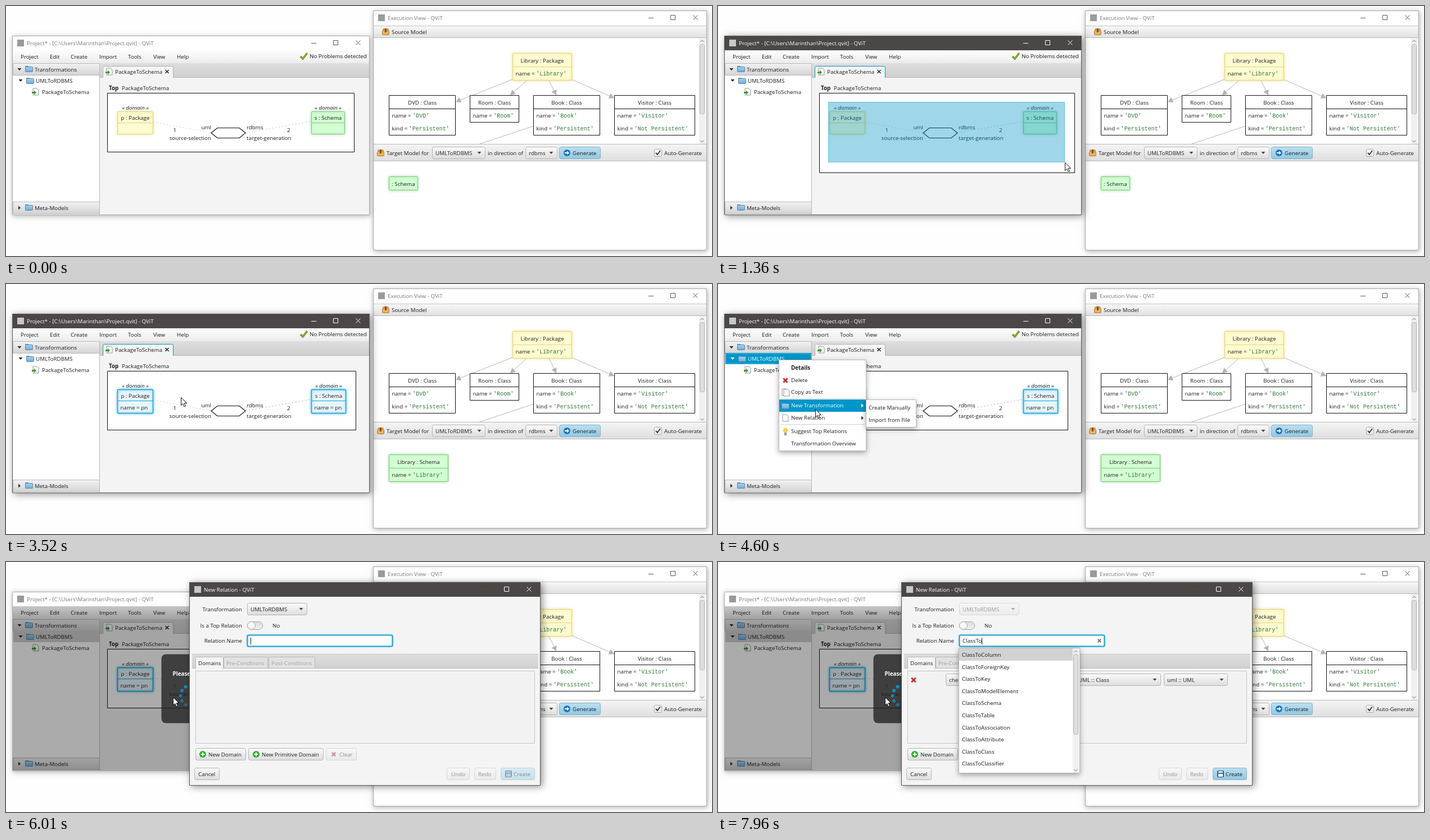
An HTML page with a canvas for the animation above (7.99 s loop, 1256 by 446 pixels).

```html
<!DOCTYPE html>
<html lang="en">
<head>
<meta charset="utf-8">
<title>Model transformation editor</title>
<style>
html, body { margin: 0; width: 100%; height: 100%; overflow: hidden; background: #fefefe; }
canvas { display: block; }
</style>
</head>
<body>
<canvas id="stage" width="1256" height="446"></canvas>
<script>
const W = 1256, H = 446, LOOP = 7990;
const SANS = '9.8px "Open Sans", "Noto Sans", sans-serif';
const MONO = '10px "Liberation Mono", monospace';
const BLUE = '#0096c9', INK = '#1c1c1c', DARK = '#4a4746';
const stage = document.getElementById('stage').getContext('2d');
const layer = Object.assign(document.createElement('canvas'), { width: W, height: H }).getContext('2d');
let g = stage;

// ---- drawing helpers ----
function text(s, x, y, color = INK, style = '', align = 'left') {
  g.font = style === 'mono' ? MONO : style + ' ' + SANS;
  g.fillStyle = color;
  g.textAlign = align;
  g.fillText(s, x, Math.round(y));
  return g.measureText(s).width;
}
function grad(y, h, top, bottom) {
  const c = g.createLinearGradient(0, y, 0, y + h);
  c.addColorStop(0, top);
  c.addColorStop(1, bottom);
  return c;
}
function rect(x, y, w, h, c) { g.fillStyle = c; g.fillRect(x, y, w, h); }
function box(x, y, w, h, fill, line, r = 0, lw = 1) {
  g.beginPath();
  g.roundRect(x + .5, y + .5, w - 1, h - 1, r);
  if (fill) { g.fillStyle = fill; g.fill(); }
  if (line) { g.strokeStyle = line; g.lineWidth = lw; g.stroke(); }
}
function glow(color, blur, dx, dy, draw) {
  g.save();
  g.shadowColor = color;
  g.shadowBlur = blur;
  g.shadowOffsetX = dx;
  g.shadowOffsetY = dy;
  draw();
  g.restore();
}
function poly(pts, fill, line, lw = 1) {
  g.beginPath();
  for (let i = 0; i < pts.length; i += 2) g.lineTo(pts[i], pts[i + 1]);
  if (fill) { g.closePath(); g.fillStyle = fill; g.fill(); }
  if (line) { g.strokeStyle = line; g.lineWidth = lw; g.stroke(); }
}
function line(x1, y1, x2, y2, c, lw = 1) { poly([x1, y1, x2, y2], null, c, lw); }
function disc(x, y, r, c) {
  g.beginPath();
  g.arc(x, y, r, 0, 7);
  g.fillStyle = c;
  g.fill();
}
function cross(x, y, r, c, lw) {
  line(x - r, y - r, x + r, y + r, c, lw);
  line(x - r, y + r, x + r, y - r, c, lw);
}
const down = (x, y, c = '#444') => poly([x - 3.5, y - 2, x + 3.5, y - 2, x, y + 2], c);
const right = (x, y, c = '#333') => poly([x - 2, y - 3.5, x + 2, y, x - 2, y + 3.5], c);
const up = (x, y) => poly([x - 3, y + 2, x, y - 1, x + 3, y + 2], null, '#666');
const chevron = (x, y) => poly([x - 3, y - 1, x, y + 2, x + 3, y - 1], null, '#666');

// ---- icons ----
function folder(x, y) {
  rect(x, y, 6, 3, '#5b97c2');
  box(x, y + 1, 14, 10, grad(y, 11, '#b5d8ee', '#6aa8d2'), '#4f8ab4', 1);
}
function page(x, y) {
  poly([x, y, x + 7, y, x + 10, y + 3, x + 10, y + 12, x, y + 12, x, y], '#fdfdfd', '#8a8a8a', .9);
}
function relation(x, y) {
  page(x + 2, y);
  poly([x, y + 6, x + 4, y + 6, x + 4, y + 3.5, x + 8, y + 7.5, x + 4, y + 11.5, x + 4, y + 9, x, y + 9], '#3f9a3a');
}
function crate(x, y) {
  box(x, y + 4, 13, 8, '#efb25a', '#b07430', 1);
  poly([x + 2, y, x + 11, y, x + 13, y + 5, x, y + 5], '#dc9444');
  rect(x + 5, y, 3, 7, '#75553a');
}
function plus(x, y) {
  disc(x, y, 6, '#2fae2f');
  rect(x - 3.5, y - 1, 7, 2, '#fff');
  rect(x - 1, y - 3.5, 2, 7, '#fff');
}

// ---- widgets ----
function button(x, y, w, h, label, lx, blue) {
  box(x, y, w, h, blue ? grad(y, h, '#bce0f0', '#90c8e2') : grad(y, h, '#fbfbfb', '#dcdcdc'), blue ? '#84b2c8' : '#b4b4b4', 3);
  text(label, lx, y + h / 2 + 4);
}
function combo(x, y, w, label, h = 22) {
  button(x, y, w, h, label, x + 6);
  down(x + w - 11, y + h / 2);
}
function faded(a, draw) {
  g.save();
  g.globalAlpha *= a;
  draw();
  g.restore();
}
function scrollbar(x, top, bottom, thumbTop, thumbBottom) {
  rect(x, top, 11, bottom - top, '#f0f0f0');
  up(x + 5.5, top + 5);
  chevron(x + 5.5, bottom - 5);
  box(x + 1, thumbTop, 9, thumbBottom - thumbTop, '#dedede', '#b2b2b2', 3);
}
function frame(x, y, w, h, title, active, noMin) {
  glow(active ? 'rgba(0,0,0,.45)' : 'rgba(0,0,0,.3)', active ? 12 : 9, active ? 3 : 1, 2,
    () => rect(x, y, w, h, '#f4f4f4'));
  rect(x, y, w, 26, active ? DARK : '#fff');
  box(x, y, w, h, null, active ? '#5a5755' : '#a8a8a8');
  const c = active ? '#fff' : '#777', ink = active ? '#fff' : '#555', m = y + 13;
  rect(x + 9, m - 6, 12, 12, active ? '#c8c8c8' : '#9a9a9a');
  text(title, x + 26, y + 17, c);
  rect(x + w - 104, m, 9, 1, noMin ? '#7a3f3c' : ink);
  box(x + w - 65, m - 5, 9, 9, null, ink);
  cross(x + w - 20.5, m - .5, 4, ink, 1);
}

// ---- diagram nodes ----
const PLAIN = { fill: '#fff', line: '#111' };
const YELLOW = { fill: '#fffbd2', line: '#e2d47c', glow: 'rgba(215,195,70,.5)' };
const GREEN = { fill: '#d4ffd4', line: '#80c680', glow: 'rgba(80,175,80,.45)' };
const PICKED = { fill: '#e7f6fd', line: '#14a0d2', glow: 'rgba(0,150,210,.6)' };
function node(x, y, w, h, title, attrs, look, head = 24) {
  const body = () => box(x, y, w, h, look.fill, look.line, look.glow ? 1 : 0, look === PICKED ? 1.4 : 1);
  look.glow ? glow(look.glow, 5, 0, 0, body) : body();
  if (h > head + 3) rect(x, y + head, w, 1, look.line);
  text(title, x + w / 2, y + head / 2 + 4.5, INK, '', 'center');
  attrs.forEach((a, i) => {
    const [key, val] = a.split('= '), by = y + head + 16 + i * 22.5;
    const kw = text(key + '= ', x + 5.5, by);
    text(val, x + 5.5 + kw, by, val[0] === "'" ? '#2f7a35' : INK, val[0] === "'" ? 'mono' : '');
  });
}
function arrow(x1, y1, x2, y2) {
  const a = Math.atan2(y2 - y1, x2 - x1), px = Math.cos(a), py = Math.sin(a);
  line(x1, y1, x2, y2, '#b4b4b4');
  poly([x2, y2, x2 - 9 * px - 5 * py, y2 - 9 * py + 5 * px, x2 - 9 * px + 5 * py, y2 - 9 * py - 5 * px], '#b4b4b4');
}

// ---- timeline ----
const PATH = [
  [50, 1094, 447], [760, 188, 168], [830, 196, 171], [900, 196, 171], [1360, 616.5, 279], [1400, 618, 281],
  [1680, 694, 354], [2080, 442, 226], [2500, 662, 318], [3090, 662, 318], [3820, 108, 135],
  [4190, 108, 135], [4600, 173, 223], [4970, 208, 237], [5410, 297, 241]
];
function pointer(t) {
  const i = PATH.findIndex(k => k[0] > t);
  if (i === 0) return PATH[0].slice(1);
  if (i < 0) return PATH[PATH.length - 1].slice(1);
  const [t0, x0, y0] = PATH[i - 1], [t1, x1, y1] = PATH[i];
  let p = (t - t0) / (t1 - t0);
  p = p * p * (3 - 2 * p);
  return [x0 + (x1 - x0) * p, y0 + (y1 - y0) * p];
}
const TYPED = [[6600, 'C'], [6740, 'C;'], [7000, 'C'], [7080, 'Cl'], [7170, 'Cla'], [7260, 'Clas'], [7330, 'Class'], [7550, 'ClassT'], [7680, 'ClassTo']];
const typed = t => TYPED.reduce((s, k) => t >= k[0] ? k[1] : s, '');

// ---- main window ----
function projectWindow(t, mx, my) {
  const active = t >= 880 && t < 5760, named = t >= 2660;
  const dragging = t >= 900 && t < 1400, picked = t >= 1400;
  const treeSel = t >= 3780, treeFocus = treeSel && t < 5760;
  const tabFocus = (t >= 880 && t < 2500) || (t >= 2700 && t < 3780);
  frame(11, 53, 636, 320, 'Project* - [C:\\Users\\Marinthan\\Project.qvit] - QViT', active);

  rect(12, 79, 634, 23, grad(79, 23, '#fdfdfd', '#ececec'));
  const menus = { Project: 26, Edit: 78, Create: 115, Import: 166, Tools: 217, View: 262, Help: 304 };
  for (const m in menus) text(m, menus[m], 94);
  poly([524, 90, 528, 94, 536, 84], null, '#5f7f20', 3.4);
  poly([524, 90, 528, 94, 536, 84], null, '#9bbb3c', 1.4);
  text('No Problems detected', 540, 93);

  rect(12, 102, 155, 270, '#fff');
  for (const y of [102, 349]) box(12, y, 155, 22, grad(y, 22, '#f3f3f3', '#d3d3d3'), '#b8b8b8');
  down(24, 113, '#222');
  folder(34, 107);
  text('Transformations', 51, 117);
  if (treeSel) rect(13, 123, 153, 20, treeFocus ? BLUE : '#cfcfcf');
  if (treeFocus) box(14, 124, 151, 18, null, '#35b0dc');
  const selInk = treeFocus ? '#fff' : INK;
  down(26, 133, selInk);
  folder(36, 128);
  text('UMLToRDBMS', 53, 137, selInk);
  relation(46, 147);
  text('PackageToSchema', 64, 157);
  right(24, 360);
  folder(34, 354);
  text('Meta-Models', 51, 364);

  rect(167, 102, 479, 26, grad(102, 26, '#dedede', '#cfcfcf'));
  rect(167, 127, 479, 245, '#f4f4f4');
  rect(167, 127, 479, 1, '#b8b8b8');
  rect(166, 102, 1, 270, '#b8b8b8');
  box(172, 107, 126, 24, '#f4f4f4', tabFocus ? BLUE : '#b0b0b0', 2);
  rect(171, 128, 128, 5, '#f4f4f4');
  relation(177, 111);
  text('PackageToSchema', 194, 121);
  cross(286.5, 117, 3, '#333', 1.7);
  text('Top', 183, 150, INK, 'bold');
  text('PackageToSchema', 206, 150);

  const r = Math.max(named ? 623 : 620, dragging ? mx + 18.5 : 0);
  const b = Math.max(261, dragging ? my + 18.5 : 0);
  box(180, 155, Math.round(r) - 180, Math.round(b) - 155, '#fff', '#111');
  g.setLineDash([2, 4]);
  line(262, 207, 365, 226, picked ? '#d8cfae' : '#dcd29c');
  line(426, 226, 543, 206, picked ? '#a8a8a8' : '#a8cca8');
  g.setLineDash([]);
  poly([365, 226.5, 376, 217.5, 415, 217.5, 426, 226.5, 415, 235.5, 376, 235.5, 365, 226.5], '#fff', '#111', 1.2);
  text('« domain »', 230, 185, INK, 'italic', 'center');
  text('« domain »', named ? 574 : 573, 185, INK, 'italic', 'center');
  const attrs = named ? ['name = pn'] : [], h = named ? 43 : 41;
  node(198, 188, 64, h, 'p : Package', attrs, picked ? PICKED : YELLOW, 20);
  node(543, 188, named ? 62 : 60, h, 's : Schema', attrs, picked ? PICKED : GREEN, 20);
  text('1', 297.5, 225);
  text('2', 500, 225);
  text('uml', 365, 220, INK, '', 'right');
  text('source-selection', 365, 239, INK, '', 'right');
  text('rdbms', 428, 220);
  text('target-generation', 428, 239);
  if (dragging) box(196, 171, Math.max(1, Math.round(mx) - 196), Math.max(1, Math.round(my) - 171), 'rgba(10,150,200,.39)', 'rgba(0,140,190,.45)');
  if (t >= 5760) waitOverlay(t);
}
function waitOverlay(t) {
  rect(12, 79, 634, 24, grad(79, 24, 'rgba(0,0,0,.22)', 'rgba(0,0,0,.32)'));
  rect(12, 103, 634, 269, 'rgba(0,0,0,.33)');
  box(276, 164, 107, 124, 'rgba(30,30,30,.76)', null, 8);
  text('Please Wait...', 329, 203, '#fff', 'bold', 'center');
  const step = Math.floor(t / 85);
  for (let i = 0; i < 12; i++) {
    const a = i * Math.PI / 6, k = ((i - step) % 12 + 12) % 12 / 11;
    faded(.15 + .85 * k, () => disc(329 + 18.5 * Math.cos(a), 238.5 + 18.5 * Math.sin(a), 1.8 + 1.4 * k, '#168fc4'));
  }
}

// ---- execution window ----
function executionWindow(t) {
  frame(653, 8, 594, 428, 'Execution View - QViT', false);
  rect(654, 34, 592, 1, '#fff');
  rect(654, 35, 592, 22, grad(35, 22, '#f8f8f8', '#e0e0e0'));
  rect(654, 35, 592, 1, '#c4c4c4');
  rect(654, 56, 592, 1, '#b8b8b8');
  crate(669, 40);
  text('Source Model', 686, 50);
  rect(654, 57, 592, 190, '#fff');
  scrollbar(1233, 57, 246, 68, 193);

  g.save();
  g.beginPath();
  g.rect(654, 57, 578, 189);
  g.clip();
  arrow(901, 131, 800, 171);
  arrow(926, 133, 897, 159);
  arrow(966, 133, 979, 159);
  arrow(1006, 131, 1082, 164);
  line(939, 214, 840, 247, '#b4b4b4');
  node(901, 84, 106, 49, 'Library : Package', ["name = 'Library'"], YELLOW);
  node(681, 159, 119, 72, 'DVD : Class', ["name = 'DVD'", "kind = 'Persistent'"], PLAIN);
  node(825, 159, 88, 49, 'Room : Class', ["name = 'Room'"], PLAIN);
  node(938, 159, 119, 72, 'Book : Class', ["name = 'Book'", "kind = 'Persistent'"], PLAIN);
  node(1082, 159, 144, 72, 'Visitor : Class', ["name = 'Visitor'", "kind = 'Not Persistent'"], PLAIN);
  g.restore();

  rect(654, 246, 592, 31, grad(246, 31, '#f5f5f5', '#dedede'));
  rect(654, 246, 592, 1, '#b8b8b8');
  rect(654, 276, 592, 1, '#b8b8b8');
  crate(660, 256);
  text('Target Model for', 677, 266);
  combo(758, 251, 95, 'UMLToRDBMS');
  text('in direction of', 857, 266);
  combo(924, 251, 57, 'rdbms');
  button(984, 251, 74, 22, 'Generate', 1008, true);
  disc(998, 262, 6, '#1f74b8');
  poly([994, 261, 998, 261, 998, 258.5, 1002, 262, 998, 265.5, 998, 263, 994, 263], '#fff');
  box(1153, 255, 14, 14, grad(255, 14, '#fff', '#e4e4e4'), '#a8a8a8', 2);
  poly([1156, 262, 1159, 265, 1164, 258], null, '#333', 1.8);
  text('Auto-Generate', 1171, 266);

  rect(654, 277, 592, 158, '#fff');
  if (t < 2660) node(681, 304, 52, 25, ': Schema', [], GREEN);
  else node(681, 304, 106, 49, 'Library : Schema', ["name = 'Library'"], GREEN);
}

// ---- context menu ----
const ITEMS = [
  ['Details', 139, 'bold'], ['Delete', 161], ['Copy as Text', 182], ['New Transformation', 206],
  ['New Relation', 228], ['Suggest Top Relations', 252], ['Transformation Overview', 274]
];
function panel(x, y, w, h) {
  glow('rgba(0,0,0,.35)', 9, 0, 3, () => rect(x, y, w, h, '#fff'));
  box(x, y, w, h, null, '#b8b8b8');
}
function entry(label, x, y, w, tx, on, style) {
  if (on) rect(x, y, w, 22, BLUE);
  text(label, tx, y + 14, on ? '#fff' : INK, style);
}
function contextMenu(mx, my) {
  panel(108, 135, 156, 163);
  const sub = mx >= 264 ? 4 : ITEMS.findIndex(i => my >= i[1] && my < i[1] + 22);
  ITEMS.forEach(([label, y, style], i) => entry(label, 109, y, 154, 130, i > 0 && i === sub, style));
  for (const y of [204, 250]) rect(112, y, 148, 1, '#d0d0d0');
  cross(120, 172, 3.6, '#c0392b', 3);
  page(114, 187);
  page(117, 188);
  folder(113, 212);
  page(115, 233);
  disc(120, 261, 4.5, '#f6cf62');
  rect(118, 265, 4, 5, '#999');
  right(257, 217, sub === 3 ? '#fff' : '#333');
  right(257, 239, sub === 4 ? '#fff' : '#333');
  if (sub === 3) {
    panel(263, 206, 90, 50);
    entry('Create Manually', 264, 210, 88, 268, false);
    entry('Import from File', 264, 232, 88, 268, false);
  } else if (sub === 4) {
    panel(263, 228, 129, 50);
    entry('Create Manually', 264, 231, 127, 268, mx >= 264);
    entry('Create from Template', 264, 253, 127, 268, false);
  }
}

// ---- dialog ----
const ENDINGS = ['Column', 'ForeignKey', 'Key', 'ModelElement', 'Schema', 'Table', 'Association', 'Attribute', 'Class', 'Classifier'];
function dialog(t) {
  const name = typed(t), bad = name.endsWith(';'), row = t >= 7380;
  frame(326, 36, 625, 363, 'New Relation - QViT', true, true);
  text('Transformation', 420, 88, INK, '', 'right');
  text('Is a Top Relation', 420, 117, INK, '', 'right');
  text('Relation Name', 420, 144, INK, '', 'right');
  faded(row ? .4 : 1, () => combo(429, 73, 107, 'UMLToRDBMS'));
  box(429, 106, 28, 15, grad(106, 15, '#dcdcdc', '#f2f2f2'), '#a4a4a4', 7);
  box(429, 106, 15, 15, grad(106, 15, '#fff', '#eee'), '#a4a4a4', 7);
  text('No', 474, 117);

  rect(331, 165, 616, 25, grad(165, 25, '#dedede', '#d0d0d0'));
  rect(331, 164, 616, 1, '#c0c0c0');
  rect(331, 189, 616, 1, '#b8b8b8');
  for (const [label, x, w] of [['Domains', 337, 50], ['Pre-Conditions', 387, 79], ['Post-Conditions', 467, 83]]) {
    const on = x === 337;
    box(x, 169, w, on ? 23 : 21, on ? '#f4f4f4' : '#e2e2e2', '#b8b8b8', 2);
    if (on) rect(x + 1, 189, w - 2, 4, '#f4f4f4');
    text(label, x + 5, 184, on ? INK : '#a0a0a0');
  }
  box(337, 194, 604, 130, '#f2f2f3', '#c6c6c6');
  if (row) {
    cross(348, 210.5, 3.8, '#c0302b', 3);
    combo(405, 199, 78, 'checkonly');
    box(488, 199, 142, 22, '#fff', '#b4b4b4', 3);
    text('c', 494, 214);
    combo(635, 199, 153, 'UML :: Class');
    combo(793, 199, 114, 'uml :: UML');
  }
  button(337, 332, 90, 22, 'New Domain', 360);
  plus(350, 343);
  button(431, 332, 134, 22, 'New Primitive Domain', 455);
  plus(445, 343);
  faded(row ? 1 : .45, () => {
    button(569, 332, 55, 22, 'Clear', 593);
    cross(583, 343, 3.5, '#b8473c', 2.6);
  });
  button(335, 367, 45, 22, 'Cancel', 342);
  faded(.45, () => {
    button(784, 367, 41, 22, 'Undo', 792);
    button(833, 367, 39, 22, 'Redo', 840);
  });
  faded(row ? 1 : .45, () => {
    button(880, 367, 61, 22, 'Create', 903, true);
    box(888, 372, 12, 12, '#4a6f94', '#2f4f70', 1);
    rect(890, 373, 8, 3, '#dfe9f2');
    rect(890, 378, 8, 5, '#fff');
  });

  const edge = bad ? '#34548c' : BLUE;
  glow(bad ? 'rgba(60,90,160,.5)' : 'rgba(0,150,200,.5)', 3, 0, 0, () => box(429, 130, 259, 21, '#fff', edge, 2, 1.6));
  const w = text(name, 435, 144);
  if (name || t % 1000 < 500) rect(Math.round(435 + w), 135, 1, 12, '#111');
  if (name) cross(678.5, 140.5, 2.8, '#777', 2);
  if (bad) {
    disc(429, 151, 4, '#a83232');
    cross(429, 151, 1.5, '#fff', 1);
    glow('rgba(170,50,50,.7)', 6, 0, 1, () => {
      box(694, 115, 78, 52, '#fff', '#b46464', 4, 1.4);
      poly([695, 134, 686, 141, 695, 148], '#fff', '#b46464');
    });
    box(695, 116, 76, 50, '#fdf7f7', '#e4b6b6', 4, 2);
    poly([697, 135, 688, 141, 697, 147], '#fdf7f7');
    text('Invalid Name', 703, 145);
  }
  if (t >= 7680) {
    panel(428, 153, 216, 224);
    rect(429, 154, 202, 22, '#d2d2d2');
    ENDINGS.forEach((e, i) => text('ClassTo' + e, 434, 169 + i * 21.6));
    scrollbar(631, 154, 376, 164, 308);
  }
}
function showDialog(t) {
  const p = Math.min(1, (t - 5770) / 190);
  if (p <= 0) return;
  if (p === 1) return dialog(t);
  layer.clearRect(0, 0, W, H);
  g = layer;
  dialog(t);
  g = stage;
  const s = .942 + .058 * p, lift = t < 5880 ? -88 : 0;
  g.save();
  g.globalAlpha = p;
  g.translate(638, 217 + lift);
  g.scale(s, s);
  g.drawImage(layer.canvas, -638, -217);
  g.restore();
}

function cursor(x, y) {
  g.save();
  g.translate(Math.round(x) + .5, Math.round(y) + .5);
  poly([0, 0, 0, 14, 3.3, 11, 5.6, 16.3, 8, 15.3, 5.7, 10.2, 10, 10, 0, 0], '#fff', '#111');
  g.restore();
}

function draw() {
  const t = performance.now() % LOOP, [mx, my] = pointer(t);
  rect(0, 0, W, H, '#fefefe');
  executionWindow(t);
  projectWindow(t, mx, my);
  if (t >= 3950 && t < 5760) contextMenu(mx, my);
  showDialog(t);
  if (t >= 50) cursor(mx, my);
  requestAnimationFrame(draw);
}
requestAnimationFrame(draw);
</script>
</body>
</html>
```
